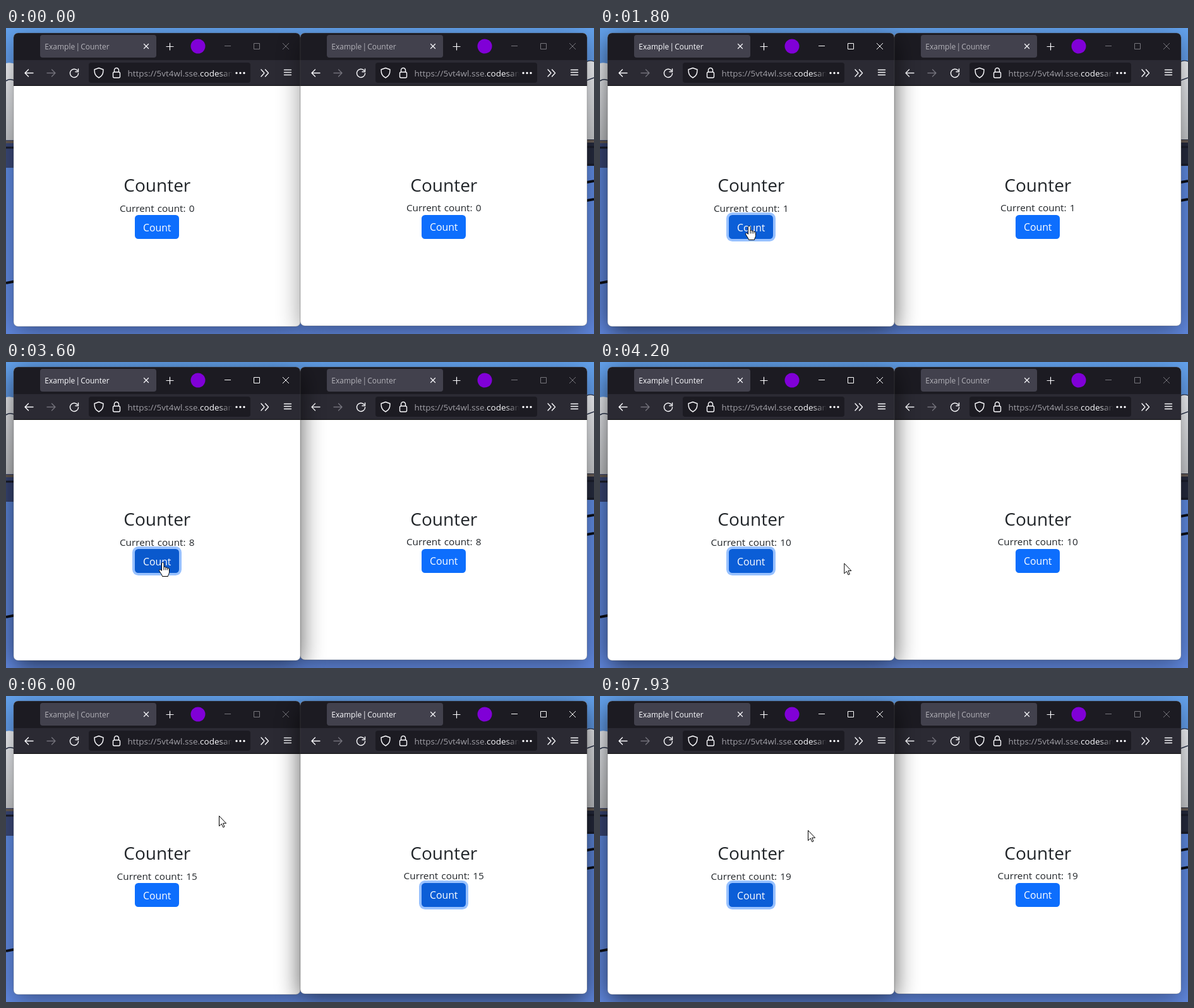
Recreate the animation shown at these times as an HTML page. Size 931 px wide and 486 px high, loop 8000 ms.

```html
<!DOCTYPE html>
<html lang="en">
<head>
<meta charset="utf-8">
<title>Counter</title>
<style>
html, body { margin: 0; width: 100%; height: 100%; overflow: hidden; background: #5c86d9; }
svg { display: block; width: 100%; height: 100%; }
text { font-family: "Open Sans", "Noto Sans", sans-serif; white-space: pre; }
.mid { text-anchor: middle; }
.icon { fill: none; stroke: #fbfbfe; stroke-width: 1.4; stroke-linecap: round; stroke-linejoin: round; }
.thin { fill: none; stroke-width: 1; }
</style>
</head>
<body>
<svg id="stage" viewBox="0 0 931 486" preserveAspectRatio="none">
  <defs>
    <linearGradient id="sky" x2="0" y2="1">
      <stop offset="0" stop-color="#64a3ee"/><stop offset=".5" stop-color="#5f8ae2"/><stop offset="1" stop-color="#628ae2"/>
    </linearGradient>
    <linearGradient id="cloud" x2="0" y2="1">
      <stop offset="0" stop-color="#f4f6fa"/><stop offset="1" stop-color="#c6c8cb"/>
    </linearGradient>
    <linearGradient id="fade">
      <stop offset="0" stop-color="#1c1b22" stop-opacity="0"/><stop offset=".85" stop-color="#1c1b22"/>
    </linearGradient>
    <filter id="blur" x="-25%" y="-25%" width="150%" height="150%"><feGaussianBlur stdDeviation="19"/></filter>
  </defs>
  <g id="desktop">
    <rect width="931" height="486" fill="url(#sky)"/>
    <path d="M0 56Q8 54 16 58V180H0Z" fill="url(#cloud)"/>
    <path d="M0 84Q7 79 16 85" fill="none" stroke="#28324a" stroke-width="1.6"/>
    <path d="M914 60Q920 49 931 53V180H914Z" fill="url(#cloud)"/>
    <path d="M914 59Q920 49 931 53M920 83L931 79" fill="none" stroke="#28324a" stroke-width="1.4"/>
    <path d="M0 178H16V222H0Z" fill="#3a4878"/>
    <path d="M914 177H931V219H914Z" fill="#252a3d"/>
    <path d="M0 181H16M914 180H931" stroke="#675c55" stroke-width="4"/>
    <path d="M0 190H16M914 189H931M914 217H931" stroke="#1a1d2a" stroke-width="3"/>
    <path d="M0 405L16 402M914 246L931 243M914 275L931 272" stroke="#0c0e16" stroke-width="4"/>
  </g>
  <g id="windows"></g>
  <g id="pointer" stroke="#000" stroke-linejoin="round" fill="#fff">
    <path id="arrow" d="M.5.5V16.6L4.3 13.1L6.8 18.6L9 17.6L6.6 12.2H11.6Z"/>
    <g id="hand" transform="translate(-.5 -1.5)">
      <path d="M-2 1.5C-2-.5 1.5-.5 1.5 1.5V7.5C2 6.5 4.5 6.5 4.5 8.3C5.2 7.4 7.3 7.6 7.3 9.2C8.2 8.6 10 9 10 10.5V15C10 18.5 8 19 8 22H-1C-1 19.5-5.8 14.5-6 12.5C-5.9 10.8-3.8 10.5-2 13Z"/>
      <path d="M1.5 7.5V12M4.5 8.3V12M7.3 9.2V12" fill="none"/>
    </g>
  </g>
</svg>
<script>
const LOOP = 8000, SHIFT = 454;
const $ = id => document.getElementById(id);

// drop: content of the left window sits one pixel lower
const windowMarkup = (h, drop) => `
  <rect class="shadow" x="12" y="18" width="454" height="${h}" rx="8" filter="url(#blur)"/>
  <rect x="12" y="8" width="454" height="${h}" rx="7" fill="#fff"/>
  <path d="M12 51V15a7 7 0 0 1 7-7H459a7 7 0 0 1 7 7V51Z" fill="#1c1b22"/>
  <rect x="12" y="51" width="454" height="40" fill="#2b2a33"/>
  <rect x="12" y="91" width="454" height="1" fill="#0c0c0d"/>
  <rect x="54" y="11" width="184" height="36" rx="4" fill="#42414d"/>
  <text class="tab" y="34" font-size="12"><tspan x="61.3">Example</tspan><tspan x="110.5">|</tspan><tspan x="118.2">Counter</tspan></text>
  <path class="icon" style="stroke-width:1.2" d="M218.5 25.5l7 7m0-7l-7 7M254 29.500h11m-5.500-5.500v11"/>
  <circle cx="304" cy="29" r="11.5" fill="#8000d7"/>
  <path class="thin controls" d="M346 28.500h10M392.500 24.500h9v9h-9ZM438 24l10 10m0-10l-10 10"/>
  <path class="icon" d="M43 71.500H30m5.500-5.500L30 71.500l5.500 5.500"/>
  <path class="icon" style="stroke:#73727b" d="M65 71.500H78m-5.500-5.500l5.500 5.500l-5.500 5.500"/>
  <path class="icon" d="M113 67.500A6.600 6.600 0 1 0 114.600 72M114.500 65v4.500h-4.500"/>
  <rect x="131" y="55" width="256" height="32" rx="4" fill="#1c1b22"/>
  <path class="icon" d="M147 63.500l7 2.500c0 6-1 10-7 13c-6-3-7-7-7-13Z"/>
  <path class="icon" d="M171.500 70v-3a3.500 3.500 0 0 1 7 0v3M171.500 70h7a2 2 0 0 1 2 2v5a2 2 0 0 1-2 2h-7a2 2 0 0 1-2-2v-5a2 2 0 0 1 2-2Z"/>
  <text x="192.500" y="77" font-size="13.500" fill="#a09fa6">https://5vt4wl.sse.<tspan fill="#fbfbfe">codesan</tspan></text>
  <rect x="336" y="58" width="27" height="26" fill="url(#fade)"/>
  <path d="M365 71.500h0m6 0h0m6 0h0" stroke="#fbfbfe" stroke-width="3.400" stroke-linecap="round"/>
  <path class="icon" d="M404 66l5 5.500l-5 5.500M410.500 66l5 5.500l-5 5.500M440.500 66.500h11m-11 4h11m-11 4h11"/>
  <text class="mid" x="239.300" y="260" font-size="28" fill="#212529">Counter</text>
  <text class="mid count" x="239.200" y="${291 + drop}" font-size="15.300" word-spacing="1.200" fill="#212529"></text>
  <rect class="ring" x="200" y="293" width="78" height="46" rx="9.500" fill="#98c1fe"/>
  <rect class="button" x="204" y="297" width="70" height="38" rx="5.500"/>
  <text class="mid" x="239.200" y="${322 + drop}" font-size="15.800" fill="#fff">Count</text>
  <rect x="12" y="8" width="454" height="${h}" rx="7" fill="none" stroke="#555" stroke-opacity=".45" stroke-width=".7"/>`;

const makeWindow = (x, h, drop) => {
  const g = document.createElementNS("http://www.w3.org/2000/svg", "g");
  g.setAttribute("transform", `translate(${x})`);
  g.innerHTML = windowMarkup(h, drop);
  $("windows").append(g);
  const part = name => g.querySelector("." + name);
  return { g, x, shadow: part("shadow"), tab: part("tab"), controls: part("controls"),
           count: part("count"), ring: part("ring"), button: part("button") };
};
const wins = [makeWindow(0, 466, 1), makeWindow(SHIFT, 465, 0)];

// Button presses, in ms
const series = (start, step, n) => Array.from({ length: n }, (_, i) => start + i * step);
const clicks = [1500, ...series(1950, 250, 7), 3700, 3900,
                ...series(4850, 190, 5), 6700, 6900, 7430, 7620];

// Which window is in front from when, and when its button gains focus
const turns = [
  { from: 0, top: 1, idle: true, focus: Infinity },
  { from: 900, top: 0, focus: 1500 },
  { from: 4300, top: 1, focus: 4850 },
  { from: 7300, top: 0, focus: 7430 }
];

// Pointer stops: time, x, y
const path = [
  [200, 310, 500], [850, 330, 215], [1350, 236, 315], [1800, 237, 316], [3600, 249, 320],
  [4000, 249, 320], [4550, 702, 318], [4730, 704, 317], [5650, 706, 319], [5980, 337, 190],
  [6200, 337, 190], [6650, 706, 318], [6930, 707, 319], [7080, 707, 319], [7380, 238, 318],
  [7650, 240, 319], [7910, 329, 213]
];

const clamp = v => Math.max(0, Math.min(1, v));

function pointerAt(t) {
  let i = 0;
  while (i < path.length - 2 && path[i + 1][0] <= t) i++;
  const [t0, x0, y0] = path[i], [t1, x1, y1] = path[i + 1];
  const u = clamp((t - t0) / (t1 - t0)), k = u * u * (3 - 2 * u);
  return [x0 + (x1 - x0) * k, y0 + (y1 - y0) * k];
}

const overButton = (win, x, y) => x >= win.x + 204 && x <= win.x + 274 && y >= 297 && y <= 335;

let front = 1;
function draw(t) {
  const turn = turns.filter(s => s.from <= t).pop();
  const done = clicks.filter(c => c <= t);
  const pressed = done.length > 0 && t - done[done.length - 1] < 160;
  const [x, y] = pointerAt(t);

  if (turn.top !== front) {
    front = turn.top;
    $("windows").append(wins[front].g);
  }
  wins.forEach((win, i) => {
    const active = i === turn.top && !turn.idle;
    const focus = active ? clamp((t - turn.focus) / 150) : 0;
    const hover = overButton(win, x, y);
    win.tab.setAttribute("fill", active ? "#fbfbfe" : "#b3b2b9");
    win.controls.setAttribute("stroke", active ? "#fff" : "#77767c");
    win.shadow.setAttribute("opacity", active ? .65 : .4);
    win.count.textContent = "Current count: " + done.length;
    win.ring.setAttribute("opacity", focus);
    win.button.setAttribute("fill",
      hover && pressed ? "#0a59cd" : hover || focus ? "#0b5ed7" : "#0d6efd");
  });

  const hand = wins.some(win => overButton(win, x, y));
  $("hand").setAttribute("visibility", hand ? "visible" : "hidden");
  $("arrow").setAttribute("visibility", hand ? "hidden" : "visible");
  $("pointer").setAttribute("transform", `translate(${x.toFixed(1)} ${y.toFixed(1)})`);
}

const start = performance.now();
function tick() {
  draw((performance.now() - start) % LOOP);
  requestAnimationFrame(tick);
}
tick();
</script>
</body>
</html>
```
